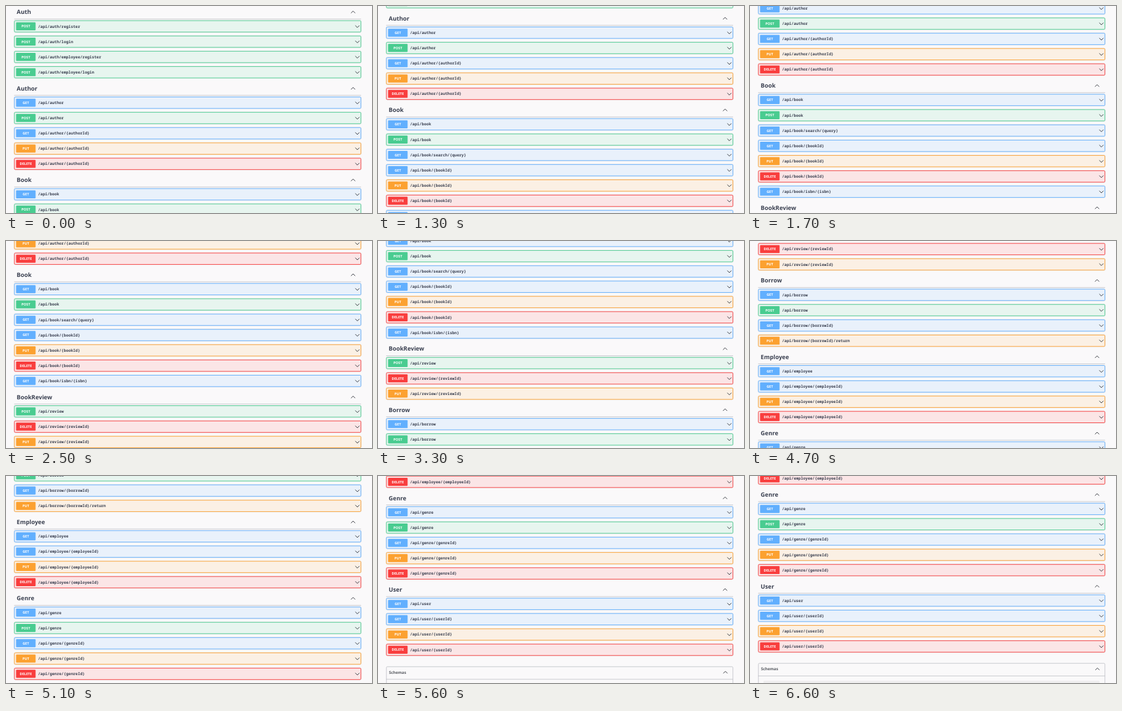
Recreate the animation shown at these times as an HTML page. Size 600 by 340 pixels, loop 8.1 s.

```html
<!DOCTYPE html>
<html lang="en">
<head>
<meta charset="utf-8">
<title>API overview</title>
<style>
  html, body { margin: 0; width: 100%; height: 100%; overflow: hidden; background: #faf9fa; }
  svg { display: block; width: 600px; height: 340px; }
  text { text-rendering: geometricPrecision; font-family: "Noto Sans", "Open Sans", sans-serif; font-weight: 700; }
  .title { font-size: 9.6px; fill: #3b4151; }
  .path { font: 700 6.4px "Noto Sans Mono", "DejaVu Sans Mono", monospace; fill: #3b4151; }
  .method { font-size: 5.6px; fill: #fff; text-anchor: middle; }
  .schemas { font-size: 6.4px; font-weight: 600; fill: #55585f; }
  .chevron { fill: none; stroke: #30333a; stroke-width: .95; }
  .rule { stroke: #b9bcc2; stroke-width: .8; }
  .shadow { fill: none; stroke: #000; stroke-opacity: .07; stroke-width: 2.2; }
</style>
</head>
<body>
<svg viewBox="0 0 600 340"><g id="list"></g></svg>
<script>
const COLORS = { POST: '#49cc90', GET: '#61affe', PUT: '#fca130', DELETE: '#f93e3e' };

const SECTIONS = [
  ['Auth', 'auth', ['POST /register', 'POST /login', 'POST /employee/register', 'POST /employee/login']],
  ['Author', 'author', ['GET', 'POST', 'GET /{authorId}', 'PUT /{authorId}', 'DELETE /{authorId}']],
  ['Book', 'book', ['GET', 'POST', 'GET /search/{query}', 'GET /{bookId}', 'PUT /{bookId}',
    'DELETE /{bookId}', 'GET /isbn/{isbn}']],
  ['BookReview', 'review', ['POST', 'DELETE /{reviewId}', 'PUT /{reviewId}']],
  ['Borrow', 'borrow', ['GET', 'POST', 'GET /{borrowId}', 'PUT /{borrowId}/return']],
  ['Employee', 'employee', ['GET', 'GET /{employeeId}', 'PUT /{employeeId}', 'DELETE /{employeeId}']],
  ['Genre', 'genre', ['GET', 'POST', 'GET /{genreId}', 'PUT /{genreId}', 'DELETE /{genreId}']],
  ['User', 'user', ['GET', 'GET /{userId}', 'PUT /{userId}', 'DELETE /{userId}']]
];

const LEFT = 13.8, WIDTH = 568, ROW_PITCH = 25.12, SECTION_GAP = 24.9;
const list = document.getElementById('list');

function add(tag, attrs, text) {
  const el = document.createElementNS('http://www.w3.org/2000/svg', tag);
  for (const key in attrs) el.setAttribute(key, attrs[key]);
  if (text) el.textContent = text;
  list.appendChild(el);
}

function addBox(y, height, attrs) {
  add('rect', { x: LEFT, y, width: WIDTH, height, rx: 1.6, ...attrs });
}

function addRule(y) {
  add('line', { class: 'rule', x1: LEFT - .4, x2: LEFT + WIDTH + .3, y1: y, y2: y });
}

// dir: 1 points down, -1 points up
function addChevron(x, y, dir) {
  const dy = 1.7 * dir;
  add('path', { class: 'chevron', d: `M${x - 3.4} ${y - dy}L${x} ${y + dy}L${x + 3.4} ${y - dy}` });
}

function addRow(y, method, path) {
  const color = COLORS[method];
  addBox(y - 9.3, 18.7, { class: 'shadow' });
  addBox(y - 9.3, 18.7, { fill: '#faf9fa' });
  addBox(y - 9.3, 18.7, { fill: color, 'fill-opacity': .11, stroke: color, 'stroke-width': .95 });
  add('rect', { x: 16.5, y: y - 6.6, width: 32, height: 13.2, rx: 1.2, fill: color });
  add('text', { class: 'method', x: 32.5, y: y + 2 }, method);
  add('text', { class: 'path', x: 52.5, y: y + 2.2 }, path);
  addChevron(576, y + .3, 1);
}

let titleY = 10;
for (const [title, base, rows] of SECTIONS) {
  add('text', { class: 'title', x: 17.6, y: titleY + 3.4 }, title);
  addChevron(569, titleY, -1);
  addRule(titleY + 11.4);
  rows.forEach((entry, i) => {
    const [method, rest = ''] = entry.split(' ');
    addRow(titleY + 23.4 + i * ROW_PITCH, method, `/api/${base}${rest}`);
  });
  titleY += SECTION_GAP + rows.length * ROW_PITCH;
}

// Schemas panel below the last section
addBox(1114.7, 60, { fill: 'none', stroke: '#b9bcc2', 'stroke-width': .8 });
add('text', { class: 'schemas', x: 18, y: 1126.1 }, 'Schemas');
addChevron(569.5, 1124, -1);
addRule(1135.4);
add('rect', { x: 22, y: 1143.3, width: 551, height: 30, rx: 1.6, fill: '#efeeef' });

const LOOP = 8100, STEP = 100;
const smooth = p => p * p * (3 - 2 * p);
const brake = p => 1 - Math.pow(1 - p, 2.74);

// first step, last step, scroll position reached, easing
const SCROLLS = [
  [100, 800, 75, smooth],
  [1000, 1700, 155, smooth],
  [2100, 2500, 230.2, smooth],
  [2700, 3100, 306, smooth],
  [3300, 4100, 409.3, smooth],
  [4200, 5000, 561.3, smooth],
  [5100, 5800, 807, brake]
];

function scrollAt(time) {
  const t = Math.floor(time / STEP) * STEP;
  let from = 0;
  for (const [start, end, to, ease] of SCROLLS) {
    if (t < start) break;
    if (t < end) return from + (to - from) * ease((t - start + STEP) / (end - start + STEP));
    from = to;
  }
  return from;
}

const began = performance.now();
function draw() {
  const time = (performance.now() - began) % LOOP;
  list.setAttribute('transform', `translate(0 ${-scrollAt(time).toFixed(2)})`);
  requestAnimationFrame(draw);
}
draw();
</script>
</body>
</html>
```
